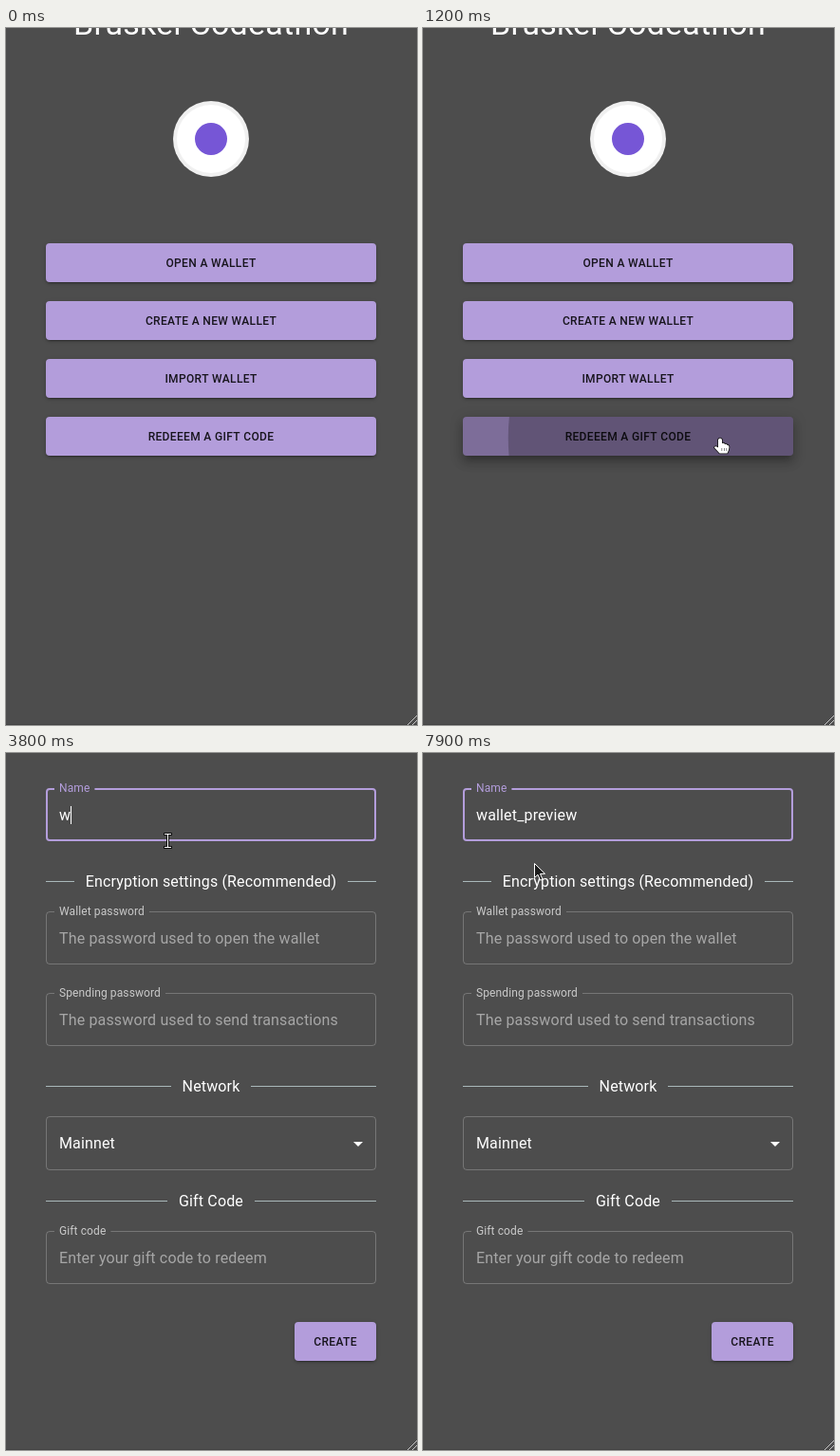
Animation, 433 px wide and 735 px high, one loop 8 s. Source, as an HTML page with a canvas:

```html
<!DOCTYPE html>
<html lang="en">
<head>
<meta charset="utf-8">
<title>Wallet setup</title>
<style>
html, body { margin: 0; width: 100%; height: 100%; overflow: hidden; background: #4d4d4d; }
canvas { display: block; width: 433px; height: 735px; }
</style>
</head>
<body>
<canvas id="stage"></canvas>
<script>
const W = 433, H = 735, LOOP = 8000, STEP = 100;
const LEFT = 42, RIGHT = 390;
const PURPLE = [179, 157, 219], DARK = [125, 109, 153];
const OUTLINE = 'rgba(255,255,255,0.23)', MUTED = 'rgba(255,255,255,0.7)';
const canvas = document.getElementById('stage');
const ctx = canvas.getContext('2d');
const ratio = window.devicePixelRatio || 1;
canvas.width = W * ratio;
canvas.height = H * ratio;

const HOVER_AT = 500, PRESS_AT = 905, FORM_AT = 1300, FOCUS_AT = 2600;

// time, x, y of the pointer's hot spot
const POINTER = [
  [500, 339, 446], [600, 328, 440], [700, 318, 435], [800, 313, 432],
  [1800, 313, 432], [1900, 304, 402], [2000, 268, 312], [2100, 212, 186],
  [2200, 162, 84], [2300, 149, 68], [2900, 149, 68], [3000, 153, 73],
  [3100, 160, 81], [3200, 167, 89], [3300, 170, 92], [7800, 170, 92],
  [7900, 117, 116]
];

// time, letters typed, caret shown
const TYPING = [
  [3800, 1, true], [3900, 2, true], [4100, 3, true], [4300, 4, true],
  [4400, 5, true], [4500, 6, true], [5000, 6, false], [6100, 7, true],
  [6200, 7, false], [6500, 9, true], [6600, 10, true], [6800, 11, true],
  [6900, 13, true], [7000, 14, true], [7400, 14, false]
];
const WALLET = 'wallet_preview';

const FIELDS = [
  { label: 'Name', hint: 'Wallet 1', y: 37, h: 56 },
  { label: 'Wallet password', hint: 'The password used to open the wallet', y: 167, h: 56 },
  { label: 'Spending password', hint: 'The password used to send transactions', y: 253, h: 56 },
  { value: 'Mainnet', y: 383, h: 57 },
  { label: 'Gift code', hint: 'Enter your gift code to redeem', y: 504, h: 56 }
];

const SHADOWS = {
  rest: [[3, 1, -2, 0.2], [2, 2, 0, 0.14], [1, 5, 0, 0.12]],
  hover: [[2, 4, -1, 0.2], [4, 5, 0, 0.14], [1, 10, 0, 0.12]],
  press: [[5, 5, -3, 0.2], [8, 10, 1, 0.14], [3, 14, 2, 0.12]]
};

const clamp = v => Math.max(0, Math.min(1, v));
const lerp = (a, b, k) => a + (b - a) * k;
const mix = (a, b, k) => a.map((v, i) => lerp(v, b[i], k));
const rgb = c => `rgb(${c.map(Math.round).join(',')})`;

// cubic-bezier(0.4, 0, 0.2, 1)
function ease(x) {
  x = clamp(x);
  let lo = 0, hi = 1;
  for (let i = 0; i < 24; i++) {
    const u = (lo + hi) / 2, v = 1 - u;
    if (1.2 * v * v * u + 0.6 * v * u * u + u * u * u < x) lo = u; else hi = u;
  }
  return lo * lo * (3 - 2 * lo);
}

function setFont(size, weight, spacing) {
  ctx.font = `${weight} ${size}px Roboto, sans-serif`;
  ctx.letterSpacing = spacing + 'px';
}

function text(str, x, y, { size = 16, weight = 400, spacing = 0.15, color = '#fff', center = false } = {}) {
  setFont(size, weight, spacing);
  const width = ctx.measureText(str).width;
  ctx.fillStyle = color;
  ctx.fillText(str, center ? x - width / 2 : x, y);
  return width;
}

function roundRect(x, y, w, h, r) {
  ctx.beginPath();
  ctx.roundRect(x, y, w, h, r);
}

function disc(x, y, r, color) {
  ctx.beginPath();
  ctx.arc(x, y, r, 0, Math.PI * 2);
  ctx.fillStyle = color;
  ctx.fill();
}

function polygon(points) {
  ctx.beginPath();
  points.forEach(([x, y]) => ctx.lineTo(x, y));
  ctx.closePath();
}

// Only the shadow lands on the stage; its caster is kept far outside.
function dropShadow(x, y, w, h, layers) {
  const away = 2000;
  for (const [dy, blur, spread, alpha] of layers) {
    ctx.save();
    ctx.shadowColor = `rgba(0,0,0,${alpha})`;
    ctx.shadowBlur = blur * ratio;
    ctx.shadowOffsetX = away * ratio;
    ctx.shadowOffsetY = dy * ratio;
    ctx.fillStyle = '#000';
    roundRect(x - away - spread, y - spread, w + 2 * spread, h + 2 * spread, 4);
    ctx.fill();
    ctx.restore();
  }
}

function button(label, x, y, w, color = rgb(PURPLE), shadow = SHADOWS.rest, ripple = null) {
  const h = 41;
  dropShadow(x, y, w, h, shadow);
  ctx.fillStyle = color;
  roundRect(x, y, w, h, 4);
  ctx.fill();
  text(label, x + w / 2, y + 25, { size: 12, weight: 500, spacing: 0.34, color: 'rgba(0,0,0,0.87)', center: true });
  if (ripple) {
    ctx.save();
    ctx.clip();
    disc(ripple.x, ripple.y, ripple.r, `rgba(0,0,0,${ripple.alpha})`);
    ctx.restore();
  }
}

function drawMenu(t) {
  text('Bruskel Codeathon', 216, 7, { size: 34, spacing: 0.25, center: true });
  disc(216, 117, 40, '#f0f0f0');
  disc(216, 117, 36, '#fff');
  disc(216, 117, 17, '#7656d6');

  const w = RIGHT - LEFT;
  button('OPEN A WALLET', LEFT, 227, w);
  button('CREATE A NEW WALLET', LEFT, 288, w);
  button('IMPORT WALLET', LEFT, 349, w);

  const hover = ease((t - HOVER_AT) / 250);
  const press = ease((t - PRESS_AT) / 250);
  const shadow = SHADOWS.rest.map((layer, i) =>
    mix(mix(layer, SHADOWS.hover[i], hover), SHADOWS.press[i], press));
  const grow = ease((t - PRESS_AT) / 550);
  const ripple = t > PRESS_AT &&
    { x: 313, y: 432, r: 273 * grow, alpha: 0.87 * (0.1 + 0.2 * grow) };
  button('REDEEEM A GIFT CODE', LEFT, 410, w, rgb(mix(PURPLE, DARK, hover)), shadow, ripple);
}

function outline(y, h, color, line, gap) {
  const o = line / 2, r = 4 - o;
  const x0 = LEFT + o, x1 = RIGHT - o, y0 = y + o, y1 = y + h - o;
  const [from, to] = gap || [100, 100];
  ctx.beginPath();
  ctx.moveTo(to, y0);
  ctx.arcTo(x1, y0, x1, y1, r);
  ctx.arcTo(x1, y1, x0, y1, r);
  ctx.arcTo(x0, y1, x0, y0, r);
  ctx.arcTo(x0, y0, x1, y0, r);
  ctx.lineTo(from, y0);
  ctx.strokeStyle = color;
  ctx.lineWidth = line;
  ctx.stroke();
}

function field(f, hovered, focus, typed) {
  const base = f.y + 34;
  let gap = null;
  if (f.label) {
    const color = `rgba(${mix([255, 255, 255, 0.7], [...PURPLE, 1], ease(focus)).join(',')})`;
    const w = text(f.label, 56, f.y + 4, { size: 12, spacing: 0.11, color: focus > 0 ? color : MUTED });
    gap = [51, 61 + w];
  }
  const focused = focus >= 0;
  outline(f.y, f.h, focused ? rgb(PURPLE) : hovered ? '#fff' : OUTLINE, focused ? 2 : 1, gap);

  if (f.value) {
    text(f.value, 56, base);
    ctx.fillStyle = '#fff';
    polygon([[366, 410], [376, 410], [371, 415]]);
    ctx.fill();
  } else if (typed) {
    const w = text(WALLET.slice(0, typed[1]), 56, base);
    if (typed[2]) ctx.fillRect(Math.round(56 + w - 0.4), f.y + 19, 1, 19);
  } else {
    text(f.hint, 56, base, { color: 'rgba(255,255,255,0.5)' });
  }
}

function heading(str, y) {
  const w = text(str, 216, y + 6, { center: true });
  const half = Math.round(w / 2) + 12;
  ctx.fillStyle = '#a9b8ba';
  ctx.fillRect(LEFT, y, 216 - half - LEFT, 1);
  ctx.fillRect(216 + half, y, RIGHT - 216 - half, 1);
}

const fieldAt = p => p && FIELDS.find(f => p.y >= f.y && p.y <= f.y + f.h);

function drawForm(t, pointer) {
  const hovered = fieldAt(pointer);
  const typed = TYPING.filter(k => k[0] <= t).pop();
  FIELDS.forEach((f, i) => {
    const active = i === 0 && t >= FOCUS_AT;
    field(f, f === hovered, active ? (t - FOCUS_AT) / 200 : -1, i === 0 && typed);
  });
  heading('Encryption settings (Recommended)', 135);
  heading('Network', 351);
  heading('Gift Code', 472);
  button('CREATE', 304, 600, 86);
}

function pointerAt(t) {
  if (t < POINTER[0][0]) return null;
  const next = POINTER.findIndex(k => k[0] > t);
  if (next < 0) return { x: 117, y: 116 };
  const a = POINTER[next - 1], b = POINTER[next];
  const k = (t - a[0]) / (b[0] - a[0]);
  return { x: lerp(a[1], b[1], k), y: lerp(a[2], b[2], k) };
}

const cursors = {
  hand() {
    ctx.beginPath();
    ctx.moveTo(-2, 2);
    ctx.quadraticCurveTo(0, -1, 2, 2);
    ctx.lineTo(2, 6);
    ctx.quadraticCurveTo(4, 5, 5, 7);
    ctx.quadraticCurveTo(7, 6, 7.5, 8);
    ctx.quadraticCurveTo(9.5, 7.5, 9.5, 10);
    ctx.lineTo(9, 13);
    ctx.lineTo(7.5, 16.5);
    ctx.lineTo(-0.5, 16.5);
    ctx.lineTo(-6, 10.5);
    ctx.quadraticCurveTo(-5.5, 8, -2, 10.5);
    ctx.closePath();
    ctx.lineWidth = 1.6;
    ctx.strokeStyle = '#111';
    ctx.stroke();
    ctx.fillStyle = '#fff';
    ctx.fill();
    ctx.fillStyle = '#555';
    for (const x of [1.5, 4, 6.5]) ctx.fillRect(x, 11, 0.7, 3);
  },
  beam() {
    const bars = [[-3, -7, 7, 1], [0, -7, 1, 15], [-3, 7, 7, 1]];
    ctx.fillStyle = '#111';
    bars.forEach(([x, y, w, h]) => ctx.fillRect(x - 1, y - 1, w + 2, h + 2));
    ctx.fillStyle = '#fff';
    bars.forEach(bar => ctx.fillRect(...bar));
  },
  arrow() {
    polygon([[0.5, 0.5], [0.5, 15.5], [4, 12.3], [6.6, 18.2], [9, 17.2], [6.5, 11.5], [11.5, 11.3]]);
    ctx.fillStyle = '#1c1c1c';
    ctx.fill();
    ctx.lineWidth = 1;
    ctx.strokeStyle = '#fff';
    ctx.stroke();
  }
};

function drawPointer(t, p) {
  if (!p) return;
  const over = fieldAt(p);
  const kind = t < FORM_AT || (over && over.value) ? 'hand' : over ? 'beam' : 'arrow';
  ctx.save();
  ctx.translate(Math.round(p.x), Math.round(p.y));
  cursors[kind]();
  ctx.restore();
}

function drawCorner() {
  ctx.fillStyle = '#434343';
  ctx.fillRect(0, H - 1, W, 1);
  ctx.strokeStyle = '#c8c8c8';
  ctx.lineWidth = 1;
  ctx.beginPath();
  for (const d of [10, 5]) {
    ctx.moveTo(W - d, H);
    ctx.lineTo(W, H - d);
  }
  ctx.stroke();
}

function frame(now) {
  const t = Math.floor((now % LOOP) / STEP) * STEP;
  const pointer = pointerAt(t);
  ctx.setTransform(ratio, 0, 0, ratio, 0, 0);
  ctx.fillStyle = '#4d4d4d';
  ctx.fillRect(0, 0, W, H);
  if (t < FORM_AT) drawMenu(t); else drawForm(t, pointer);
  drawCorner();
  drawPointer(t, pointer);
}

const start = performance.now();
function tick() {
  frame(performance.now() - start);
  requestAnimationFrame(tick);
}
tick();
</script>
</body>
</html>
```
